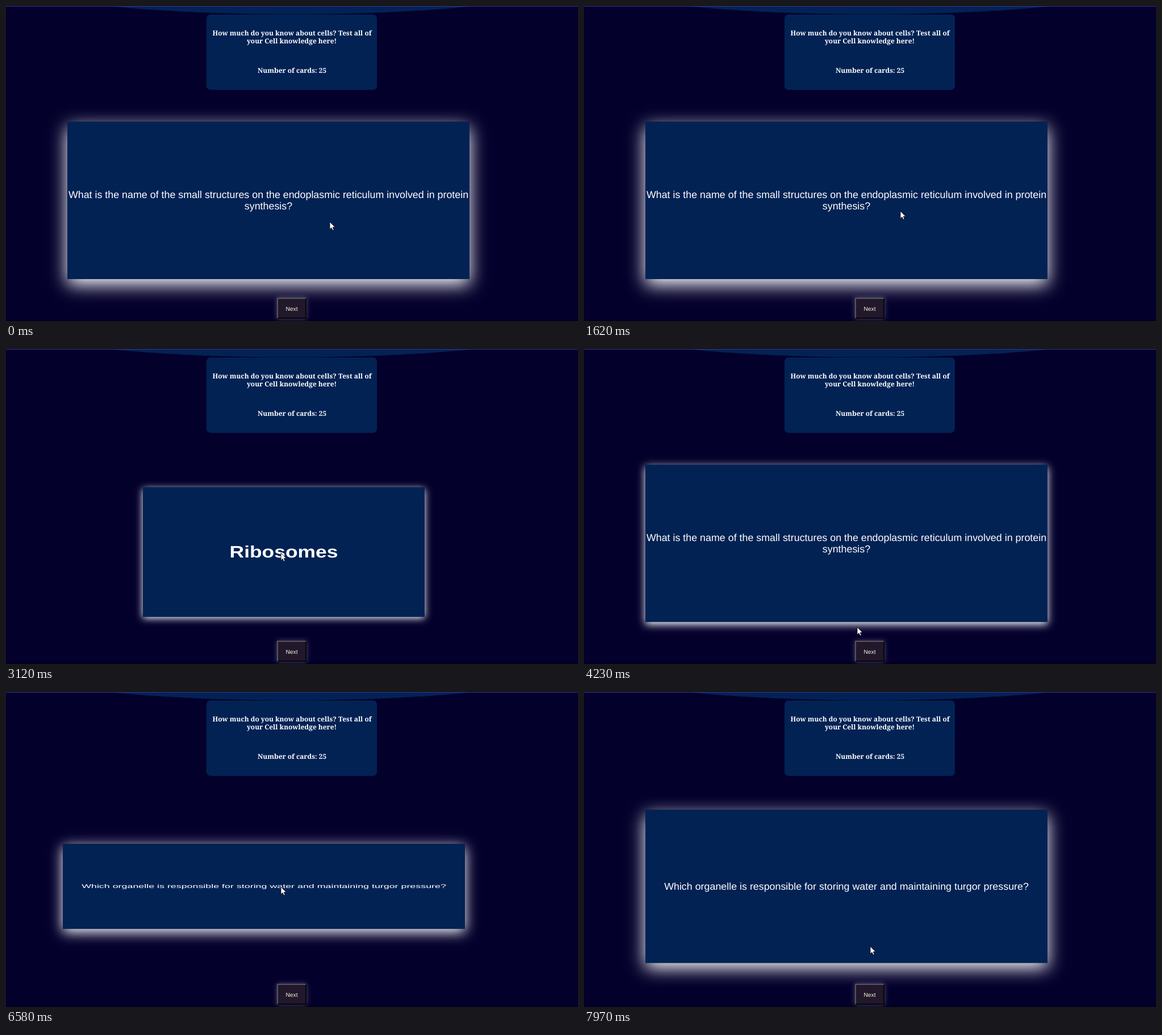
Animation, 1007 px wide and 556 px high, one loop 8 s. Source, as an HTML page:

```html
<!DOCTYPE html>
<html lang="en">
<head>
<meta charset="utf-8">
<title>Flash cards</title>
<style>
  html, body { margin: 0; width: 100%; height: 100%; overflow: hidden; background: #04002c; }
  #stage { position: absolute; left: 0; top: 0; width: 1007px; height: 556px; overflow: hidden; }
  #page, svg { position: absolute; left: 0; top: 0; }
  svg { overflow: visible; }
  text { text-anchor: middle; fill: #fff; text-rendering: geometricPrecision;
         font-family: "Liberation Sans", Arial, sans-serif; }
  .title { font: bold 11.9px "Noto Serif", serif; }
  .card { position: absolute; background: #022254; }
  /* both faces turn about the line y = 343 */
  #front { left: 108px; top: 204px; width: 708px; height: 278px; transform-origin: 50% 139px; }
  #back { left: 241px; top: 222.5px; width: 496px; height: 277px; transform-origin: 50% 120.5px;
          box-shadow: 0 4px 14px #fff; }
  #front text { font-size: 17.85px; }
  #back text { font-size: 35.4px; font-weight: bold; }
  #next { position: absolute; left: 477px; top: 515px; width: 48px; height: 33px; background: #21182b;
          border: 2px solid; border-color: #59545c #08050c #08050c #59545c;
          box-shadow: 0 0 8px rgba(255, 255, 255, .3); }
  #next text { font-size: 10.2px; fill: #f8f3dc; }
</style>
</head>
<body>
<div id="stage">
  <div id="page">
    <svg width="1007" height="556">
      <rect y="553" width="1007" height="3" fill="#03001f"/>
      <ellipse cx="503" cy="-65" rx="560" ry="79.6" fill="#022254"/>
      <rect x="353" y="15" width="300" height="133" rx="7" fill="#022254"/>
      <g class="title">
        <text class="title" x="503.5" y="52">How much do you know about cells? Test all of</text>
        <text class="title" x="503" y="66">your Cell knowledge here!</text>
        <text class="title" x="503.5" y="118">Number of cards: 25</text>
      </g>
    </svg>
    <div id="front" class="card">
      <svg width="708" height="278">
        <g id="q1">
          <text x="354" y="134.5">What is the name of the small structures on the endoplasmic reticulum involved in protein</text>
          <text x="354" y="155">synthesis?</text>
        </g>
        <g id="q2">
          <text x="354" y="145">Which organelle is responsible for storing water and maintaining turgor pressure?</text>
        </g>
      </svg>
    </div>
    <div id="back" class="card">
      <svg width="496" height="277"><text id="answer" x="248" y="150.4">Ribosomes</text></svg>
    </div>
    <div id="next"><svg width="48" height="33"><text x="24" y="20.5">Next</text></svg></div>
  </div>
  <svg width="1007" height="556">
    <rect width="1007" height="1" fill="#3d3192"/>
    <path id="cursor" d="M0 0V13.2L3 10.4L5 15L7.2 14L5.2 9.6H9.3Z"
          fill="#fff" stroke="#000" stroke-width=".8"/>
  </svg>
</div>
<script>
const LOOP = 8000, FLIP = 800;
const $ = id => document.getElementById(id);
const page = $('page'), front = $('front'), back = $('back'), cursor = $('cursor');

// start of each half turn: [time, turns to the answer]
const flips = [[2715, true], [3560, false], [6413, true], [7434, false]];
const nextAt = 4870;
// pointer tip: time, x, y
const path = [
  [0, 570, 381], [150, 570, 381], [1010, 557, 362], [1620, 557, 362],
  [2190, 461, 353], [2550, 484, 360], [3600, 484, 360], [4230, 481, 491],
  [4630, 496, 530], [5450, 496, 530], [6400, 484, 344], [7500, 484, 344], [7970, 504, 449]
];

const within = (t, a, b) => t >= a && t < b;

// cubic-bezier(.25, .1, .25, 1)
function ease(x) {
  if (x <= 0) return 0;
  if (x >= 1) return 1;
  const curve = (s, a, b) => 3 * (1 - s) * (1 - s) * s * a + 3 * (1 - s) * s * s * b + s * s * s;
  let lo = 0, hi = 1;
  for (let i = 0; i < 24; i++) {
    const mid = (lo + hi) / 2;
    if (curve(mid, .25, .25) < x) lo = mid; else hi = mid;
  }
  return curve(lo, .1, 1);
}

function pointer(t) {
  const i = path.findIndex(p => p[0] > t);
  if (i < 0) return path[path.length - 1].slice(1);
  const [t0, x0, y0] = path[i - 1], [t1, x1, y1] = path[i];
  const k = (t - t0) / (t1 - t0);
  return [x0 + (x1 - x0) * k, y0 + (y1 - y0) * k];
}

function draw(t) {
  const flip = flips.filter(f => f[0] <= t).pop();
  const turn = flip ? ease((t - flip[0]) / FLIP) : 0;
  const toBack = !!flip && flip[1];
  const c = Math.cos(Math.PI * (flip && !toBack ? 1 - turn : turn));

  page.style.transform = `translateY(${within(t, 395, 1620) ? 1 : 0}px)`;
  front.style.visibility = c > 0 ? 'visible' : 'hidden';
  back.style.visibility = c > 0 ? 'hidden' : 'visible';
  front.style.transform = `translateX(${toBack ? -8 : 0}px) scaleY(${Math.abs(c)})`;
  back.style.transform = `scaleY(${Math.abs(c)})`;
  front.style.boxShadow = within(t, 4120, 5800) ? '0 4px 14px #fff' : '0 10px 30px #fff';

  const second = t >= nextAt;
  $('q1').style.display = second ? 'none' : '';
  $('q2').style.display = second ? '' : 'none';
  $('answer').textContent = second ? 'Vacuole' : 'Ribosomes';

  const [x, y] = pointer(t);
  cursor.setAttribute('transform', `translate(${Math.round(x)} ${Math.round(y)})`);
}

const start = performance.now();
function tick() {
  draw((performance.now() - start) % LOOP);
  requestAnimationFrame(tick);
}
tick();
</script>
</body>
</html>
```
